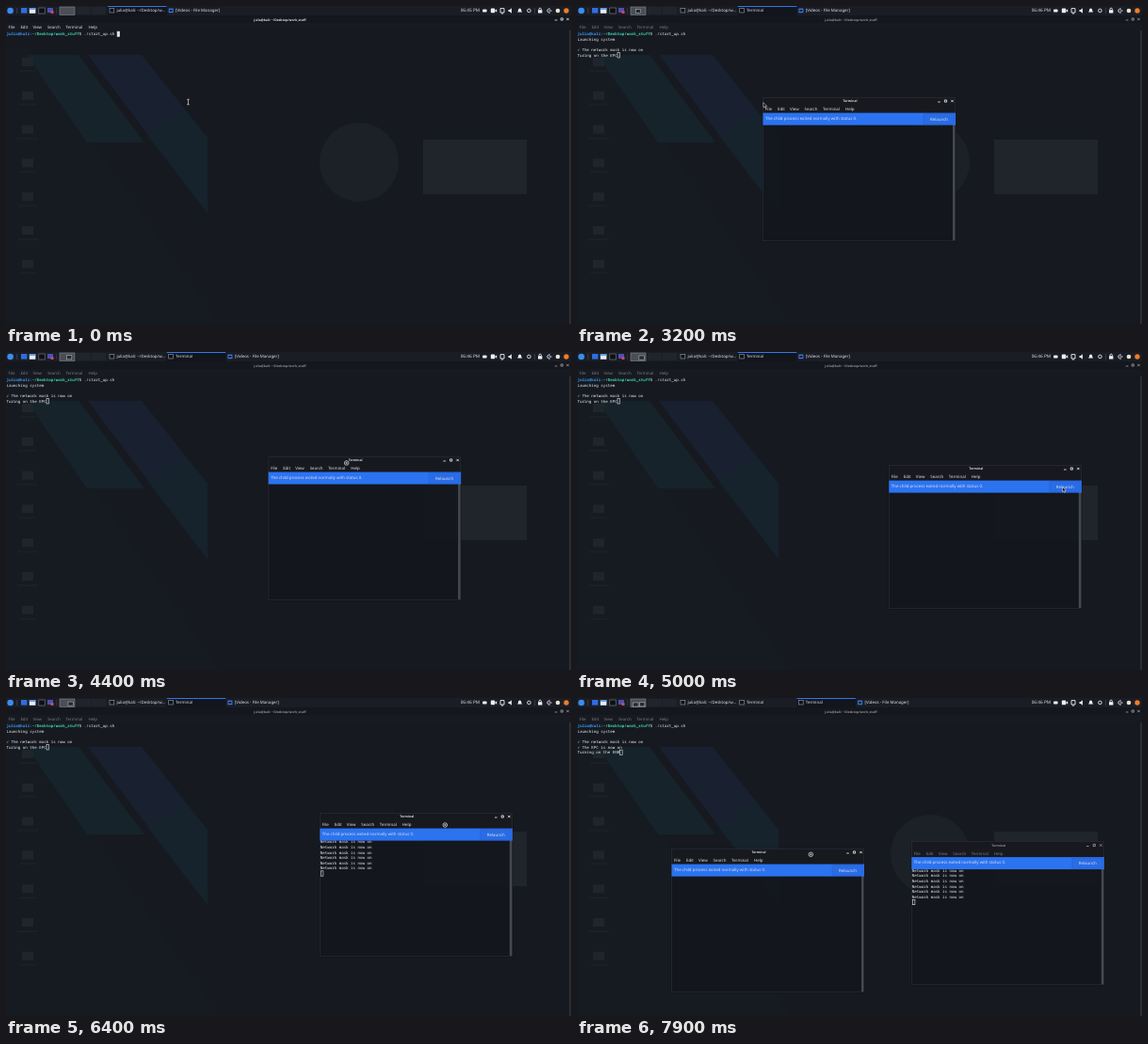
Recreate the animation shown at these times as an HTML page. Size 600 by 338 pixels, loop 8000 ms.

```html
<!DOCTYPE html>
<html lang="en">
<head>
<meta charset="utf-8">
<title>Terminal start-up</title>
<style>
  html, body { margin: 0; width: 100%; height: 100%; overflow: hidden; background: #161a20; }
  svg { display: block; width: 600px; height: 338px; }
  text { font: 4.4px "Noto Sans", "Open Sans", sans-serif; fill: #dfe1e5; white-space: pre; text-rendering: geometricPrecision; }
  .mono { font: 500 4.17px "Noto Sans Mono", "DejaVu Sans Mono", monospace; fill: #eceef0; }
  .user { fill: #3a97ee; font-weight: 700; }
  .path { fill: #3fd0b4; font-weight: 700; }
  .title { font-size: 3.4px; font-weight: 700; text-anchor: middle; }
  .clock { font-size: 4.7px; }
  .mid { text-anchor: middle; }
  .ctl { fill: none; stroke: #f0f1f3; stroke-width: .8; }
  .off .title { fill: #8d9097; }
  .off .menu { fill: #767a82; }
  .off .ctl { stroke: #a0a3a9; }
</style>
</head>
<body>
<svg id="stage" viewBox="0 0 600 338" xmlns="http://www.w3.org/2000/svg"></svg>
<script>
const LOOP = 8000, STEP = 100;
const CH = 2.502, ROW = 5.62;
const WIN_W = 204.5, WIN_H = 152.5;
const stage = document.getElementById('stage');

function el(tag, attrs = {}, parent = stage, text) {
  const node = document.createElementNS('http://www.w3.org/2000/svg', tag);
  for (const k in attrs) node.setAttribute(k, attrs[k]);
  if (text !== undefined) node.textContent = text;
  parent.appendChild(node);
  return node;
}
const rect = (x, y, width, height, fill, parent, more) =>
  el('rect', { x, y, width, height, fill, ...more }, parent);
const path = (d, attrs, parent) => el('path', { d, fill: 'none', ...attrs }, parent);
// y is the vertical middle of the line
const label = (x, y, text, parent, cls = '') =>
  el('text', { x, y: y + 1.55, class: cls }, parent, text);
const move = (node, x, y) => node.setAttribute('transform', `translate(${x} ${y})`);
const show = (node, on) => node.setAttribute('display', on ? 'inline' : 'none');

// ---------- desktop seen through the main terminal ----------
rect(0, 0, 600, 338, '#161a20');
path('M0 45H22L226 338H0Z', { fill: '#161b22' });
path('M22 52H77L147 145H86Z', { fill: '#16232a' });
path('M87 52H144L214 140V220Z', { fill: '#192130' });
path('M150 138L214 220V140L190 110Z', { fill: '#15242b', opacity: .6 });
el('circle', { cx: 375, cy: 166, r: 42, fill: '#1c2127' });
rect(443, 142, 110, 58, '#20252b');
for (let i = 0; i < 7; i++) {
  const y = 55 + i * 35.8;
  rect(17, y, 12, 9, '#1e252c');
  rect(14 - i % 3, y + 13, 18 + i % 3 * 2, 2, '#1b2026');
}

// ---------- shared window parts ----------
const MENU = [['File', 2], ['Edit', 15], ['View', 28], ['Search', 43.5], ['Terminal', 63], ['Help', 87]];
function menu(x, y, parent) {
  MENU.forEach(([name, dx]) => label(x + dx, y, name, parent, 'menu'));
}
function controls(right, y, gap, parent) {
  const a = right - 2 * gap, b = right - gap, c = right;
  path(`M${a - 1.3} ${y + 1}h2.6M${b - 1.1} ${y - 1.1}h2.2v2.2h-2.2z` +
    `M${c - 1.2} ${y - 1.2}l2.4 2.4m0 -2.4l-2.4 2.4`, { class: 'ctl' }, parent);
}
function caret(parent) {
  return rect(0, 0, 2.6, 5.4, '#e4e6e8', parent, { stroke: '#e4e6e8', 'stroke-width': .6 });
}
function putCaret(node, x, y, solid) {
  node.setAttribute('x', x);
  node.setAttribute('y', y - 2.7);
  node.setAttribute('fill', solid ? '#e4e6e8' : 'none');
}

// ---------- main terminal ----------
const main = el('g');
rect(0, 10, 600, 8, '#14171d', main);
rect(0, 18, 600, 8, '#171a20', main);
rect(598, 26, 2, 312, '#2a2e35', main);
label(291, 14, 'julia@kali: ~/Desktop/work_stuff', main, 'title');
controls(596.5, 14, 6.2, main);
menu(0.4, 22.5, main);
const prompt = label(.4, 29.8, '', main, 'mono');
[['julia@kali', 'user'], [':', ''], ['~/Desktop/work_stuff', 'path'], ['$ ./start_up.sh', '']]
  .forEach(([s, cls]) => el('tspan', { class: cls }, prompt, s));
const rows = [1, 2, 3, 4, 5].map(i => label(.4, 29.8 + i * ROW, '', main, 'mono'));
const mainCaret = caret(main);

const HEAD = ['Launching system', ''];
const MASK = '✓ The network mask is now on';
const OUTPUT = [
  [0, []],
  [200, HEAD],
  [300, [...HEAD, 'Turning on Network mask']],
  [3000, [...HEAD, MASK, 'Turing on the EPC']],
  [7000, [...HEAD, MASK, '✓ The EPC is now on', 'Turning on the ENB']]
];

// ---------- small terminals ----------
function makeWindow() {
  const g = el('g');
  rect(-1, -.5, WIN_W + 2, WIN_H + 2, '#000', g, { opacity: .18, rx: 1 });
  rect(0, 0, WIN_W, 17, '#17191f', g);
  rect(0, 17, WIN_W, WIN_H - 17, '#13171d', g, { opacity: .9 });
  const lines = el('g', {}, g);
  for (let i = 0; i < 8; i++) label(.4, 19.4 + i * 5.64, 'Network mask is now on', lines, 'mono');
  const cur = caret(g);
  putCaret(cur, 1, 64.5, false);
  rect(201.5, 17, 2.5, WIN_H - 17.5, '#45494f', g);
  rect(.2, .2, WIN_W - .4, WIN_H - .4, 'none', g, { stroke: '#33373e', 'stroke-width': .5 });
  label(92.5, 3.7, 'Terminal', g, 'title');
  controls(201, 4, 7, g);
  menu(.5, 12.5, g);
  const bar = el('g', {}, g);
  rect(0, 16.6, WIN_W, 13, '#2b73f1', bar);
  rect(170.5, 17.6, 32.5, 11, '#296ce6', bar, { stroke: '#2360d0', 'stroke-width': .5, rx: .8 });
  label(2.5, 22.3, 'The child process exited normally with status 0.', bar);
  label(187, 23.3, 'Relaunch', bar, 'mid');
  return { g, lines, cur, bar };
}
const first = makeWindow(), second = makeWindow();
show(second.lines, false);
show(second.cur, false);

// ---------- panel ----------
rect(0, 0, 600, 10, '#1a1d25');
el('circle', { cx: 4.6, cy: 5, r: 3.3, fill: '#3b8cf0' });
rect(11.5, 2, .6, 6, '#4b4f58');
rect(16, 2, 6.4, 5.6, '#2f6de0');
rect(24.8, 2.2, 6.6, 5.6, '#e7ebf2');
rect(24.8, 2.2, 6.6, 1.6, '#4d93ee');
rect(34.8, 2, 6.4, 6, '#0d0f13', stage, { stroke: '#7d828c', 'stroke-width': .6 });
rect(44, 2, 6, 5, '#4a50b8');
rect(47.5, 5, 3, 3, '#d2455f');
rect(53, 2, .6, 6, '#3b3f47');
[75, 91].forEach(x => rect(x, 1, 15, 8, '#20242c'));
rect(57, 1, 16, 8.4, '#4a4e56', stage, { stroke: '#858a92', 'stroke-width': .6 });
const thumbs = [first, second].map(() =>
  rect(0, 0, 5.4, 4.1, '#25292f', stage, { stroke: '#c3c6cb', 'stroke-width': .5 }));

const active = el('g');
rect(0, 0, 62.5, 10, '#12151b', active);
rect(0, 0, 62.5, 1, '#2f78f0', active);
function task(name, isTerm) {
  const g = el('g');
  if (isTerm) rect(2, 2.6, 4.8, 4.4, '#101318', g, { stroke: '#9a9ea6', 'stroke-width': .6 });
  else {
    rect(2, 2.6, 5, 4.6, '#3a78d8', g);
    rect(3, 4, 3, 1.8, '#0e1a30', g);
  }
  label(9.4, 4.9, name, g);
  return g;
}
const tasks = [
  task('julia@kali: ~/Desktop/w...', true),
  task('Terminal', true), task('Terminal', true),
  task('[Videos - File Manager]', false)
];
const clock = label(482.7, 4.8, '', stage, 'clock');

const WHITE = '#eef0f2';
const line = { stroke: WHITE, 'stroke-width': .9 };
rect(506, 3.4, 4.6, 3, WHITE, stage, { rx: 1 });
rect(514.8, 2.6, 4.4, 4.6, WHITE, stage, { rx: .8 });
path('M519 5l2.2 -1.7v3.4z', { fill: WHITE });
path('M525 2.6h4v4.4h-4zM526 8h2', line);
path('M533.5 4h1.4l2 -1.8v5.6l-2 -1.8h-1.4z', { fill: WHITE });
path('M543 6.6q1 -1 1 -2.4a1.6 1.6 0 0 1 3.2 0q0 1.4 1 2.4z', { fill: WHITE });
el('circle', { cx: 555.4, cy: 4.9, r: 1.8, ...line, fill: 'none' });
rect(561, 2, .6, 6, '#4b4f58');
rect(565, 4.2, 4.4, 3.3, WHITE);
path('M566 4.4v-1a1.2 1.2 0 0 1 2.4 0v1', line);
path('M578 3.2a2.1 2.1 0 1 0 0 3.6M576.6 5h3', line);
el('circle', { cx: 586, cy: 5, r: 2.3, fill: '#e9e2cf' });
el('circle', { cx: 595, cy: 5, r: 2.7, fill: '#ee7c25' });

// ---------- pointer ----------
const pointer = el('g');
const shapes = {
  beam: path('M-1.2 -2.7h2.4M0 -2.7v5.4M-1.2 2.7h2.4', { stroke: '#e6e8ea', 'stroke-width': .7 }, pointer),
  arrow: path('M0 0V5.2L1.3 4.1L2.2 6L3 5.6L2.2 3.8H3.8Z', { fill: '#0b0c0e', stroke: '#f2f3f4', 'stroke-width': .5 }, pointer),
  grab: el('g', {}, pointer)
};
el('circle', { r: 2.3, fill: '#16191f', stroke: '#e6e8ea', 'stroke-width': .7 }, shapes.grab);
path('M-1.3 0h2.6M0 -1.3v2.6', { stroke: '#e6e8ea', 'stroke-width': .6 }, shapes.grab);

// ---------- motion tables: time, x, y ----------
const FIRST_AT = [[0, 197.5, 97], [4000, 197.5, 97], [4700, 331.3, 120], [6300, 331.3, 120],
  [6400, 333.3, 122], [6500, 333.3, 122], [6900, 355.3, 152.5]];
const SECOND_AT = [[0, 197.5, 97], [7700, 197.5, 97], [7900, 100.5, 160]];
const POINTER_AT = [[0, 193.5, 102], [700, 193.5, 102], [800, 193, 102.5], [3100, 193, 102.5],
  [3800, 280.5, 104], [4000, 280.5, 104], [4700, 414.3, 127], [5000, 515.5, 143.5],
  [5600, 517, 144.5], [5900, 517, 144.5], [6300, 464, 133], [6400, 466.3, 135],
  [6500, 466.3, 135], [6900, 488.3, 165.5], [7200, 350.5, 110.5], [7300, 350.5, 110.5],
  [7400, 346.8, 106.5], [7500, 346.8, 106.5], [7600, 345.3, 103.5], [7700, 345.3, 103.5],
  [7900, 248.3, 166.3]];
const SHAPE = [[0, 'beam'], [3200, 'arrow'], [4000, 'grab'], [4800, 'arrow'],
  [6400, 'grab'], [7000, 'arrow'], [7800, 'grab']];

const last = (table, t) => table.filter(row => row[0] <= t).pop();
function along(table, t) {
  const a = last(table, t);
  const b = table[table.indexOf(a) + 1];
  if (!b) return [a[1], a[2]];
  const k = (t - a[0]) / (b[0] - a[0]), e = k * k * (3 - 2 * k);
  return [a[1] + (b[1] - a[1]) * e, a[2] + (b[2] - a[2]) * e];
}

function draw(t) {
  const opened = t >= 3000, two = t >= 7000, ran = t >= 5700;

  const out = last(OUTPUT, t)[1];
  rows.forEach((r, i) => { r.textContent = out[i] || ''; });
  const col = out.length ? out[out.length - 1].length : 47;
  putCaret(mainCaret, .5 + col * CH, 29.8 + out.length * ROW, !opened);
  show(mainCaret, opened || t < 200 || Math.floor((t - 200) / 600) % 2 === 0);
  main.setAttribute('class', opened ? 'off' : '');

  [[first, FIRST_AT, opened], [second, SECOND_AT, two]].forEach(([w, table, on], i) => {
    const [x, y] = along(table, t);
    move(w.g, x, y);
    show(w.g, on);
    move(thumbs[i], 57 + x * .0267, 1 + y * .0248);
    show(thumbs[i], on);
  });
  first.g.setAttribute('class', two ? 'off' : '');
  show(first.lines, ran);
  show(first.cur, t >= 6000);
  show(first.bar, t < 5700 || t >= 5800);

  const count = opened + two;
  const slot = i => 108 + i * 62.7;
  move(active, slot(count), 0);
  tasks.forEach((g, i) => move(g, slot(i === 3 ? count + 1 : i), 0));
  show(tasks[1], opened);
  show(tasks[2], two);
  clock.textContent = opened ? '06:46 PM' : '06:45 PM';

  move(pointer, ...along(POINTER_AT, t));
  const shape = last(SHAPE, t)[1];
  for (const k in shapes) show(shapes[k], k === shape);
}

const start = performance.now();
function tick() {
  const t = (performance.now() - start) % LOOP;
  draw(Math.floor(t / STEP) * STEP);
  requestAnimationFrame(tick);
}
tick();
</script>
</body>
</html>
```
